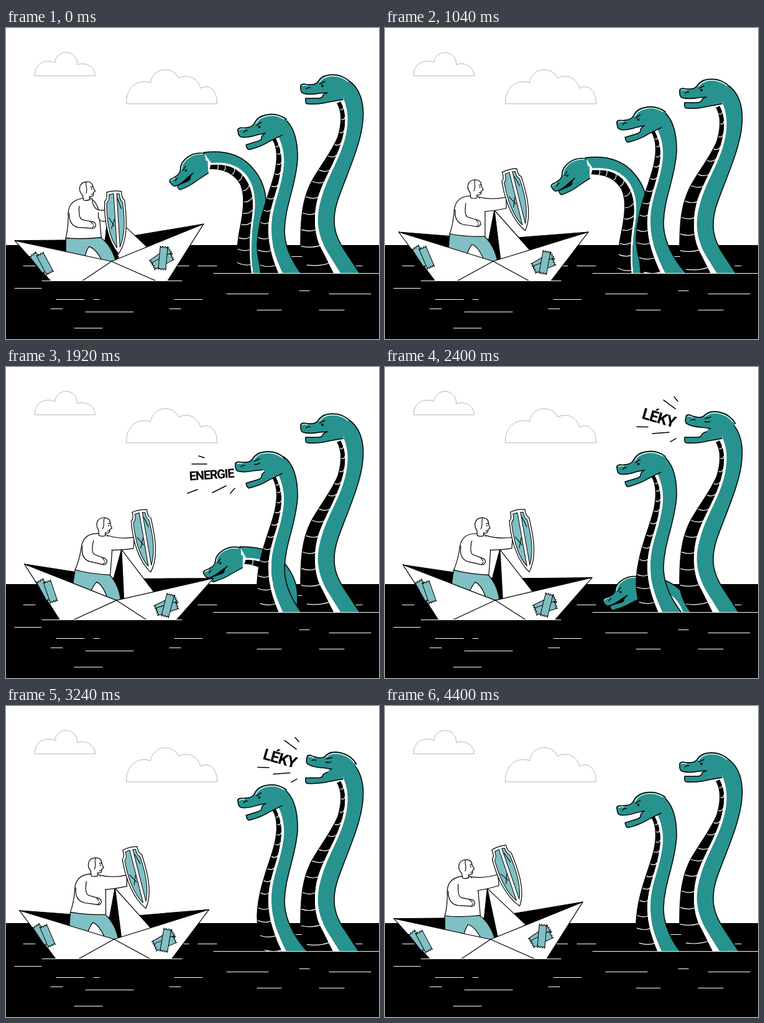
An HTML page for the animation above (4.44 s loop, 600x500 px).

```html
<!DOCTYPE html>
<html lang="cs">
<head>
<meta charset="utf-8">
<title>Paper boat and sea serpents</title>
<style>
  html, body { margin: 0; height: 100%; overflow: hidden; background: #fff; }
  svg { display: block; width: 600px; height: 500px; }
  path, polygon { stroke-linejoin: round; stroke-linecap: round; }
  .line { fill: none; stroke: #000; stroke-width: 1.5; }
  .thin { fill: none; stroke: #fff; stroke-width: 1.2; }
  .teal { fill: #27928e; }
  .pale { fill: #80bfc3; }
  .paper { fill: #fff; stroke: #000; stroke-width: 1.2; }
  .cloud { fill: #fff; stroke: #b4b4b4; }
  text { font-family: Roboto, 'Open Sans', sans-serif; font-weight: 700; letter-spacing: -1.2px; text-anchor: middle; }
</style>
</head>
<body>
<svg viewBox="0 0 600 500">
  <clipPath id="aboveFar"><path d="M0,0H600V394H0Z"/></clipPath>
  <clipPath id="aboveNear"><path d="M0,0H600V406H0Z"/></clipPath>

  <path class="cloud" d="M46,76.500C46,57 63,49 78.500,55.500A18,18 0 0 1 114.500,59C128,54 143,62 143.500,76.500Z"/>
  <path class="cloud" d="M193.500,121.500C193,95 212,81 232.500,88A24,24 0 0 1 278,80.500C293,73 309,81 313,97C327,89 340,101 339.500,121.500Z"/>

  <path d="M0,349H600V500H0Z"/>
  <path class="thin" d="M28,382.500h19M276,382.500h18M309,382.500h30M458,367.500h24M563,382.500h10"/>

  <g id="beasts" clip-path="url(#aboveFar)"></g>

  <g clip-path="url(#aboveNear)">
    <g id="boat">
      <path d="M22,328L174,340L327,328L174,375Z" stroke="#000"/>
      <path class="paper" d="M158,293L176,293L167,340H158Z"/>
      <path d="M176,293L167,340L186,372Z" stroke="#000"/>
      <path class="paper" d="M176,293L233,357L186,374Z"/>

      <path class="paper" d="M126,345H150L170,376H126Z" stroke="none"/>
      <path class="pale" stroke="#000" stroke-width="1.2" d="M104,331L160,335Q176,350 181,375H160Q151,352 140,348Q136,353 132,363L102,356Z"/>
      <path class="paper" d="M136,270C118,271 111,282 111,298Q109,318 104,331Q130,336 161,335L161,294Q160,280 150,271Z"/>
      <path class="paper" d="M130,282Q127,301 133,304L146,308Q154,309 154,315Q152,321 146,319L126,316Q111,312 113,292"/>
      <path class="line" style="stroke-width:1.1" d="M146,308L150,313M148,319L151,315"/>
      <path class="paper" d="M138,273L137,265C130,256 133,244 145,244C153,244 155,249 155,254L158,260L155,262C155,268 153,269 148,268L148,273Q142,275 138,273Z"/>
      <path class="line" style="stroke-width:1.1" d="M145,244C142,250 147,256 143,262M151,253L155,252M151,265L154,264"/>
      <circle cx="152.500" cy="256" r="1"/>

      <path id="arm" class="paper"/>
      <g id="shield">
        <path class="paper" d="M-12,1Q0,-2 12,1Q11,12 16,15C18,45 18,80 1,101C-15,80 -19,45 -16,15Q-11,12 -12,1Z"/>
        <g class="pale" stroke="#000">
          <path d="M-8.500,5L-1,4L-1,91C-12,75 -15,45 -13,18Q-7.500,14 -8.500,5Z"/>
          <path d="M4,4L8.500,5Q8,14 12.500,18C15,45 13,72 4,90Z"/>
        </g>
        <path class="line" style="stroke-width:1.1" d="M-11,42L-3,56M-2,45L-8,60M5,12L10,29"/>
      </g>

      <path class="paper" d="M22,328L174,375L327,328L256,421H91Z"/>
      <path class="line" style="stroke-width:1.2" d="M90,421L174,375L258,421"/>
      <g id="patches"></g>
    </g>
  </g>

  <path class="thin" d="M58,406.500H283M334,394.500H600M14,418.500h43M81,436.500h45M141,436.500h9M271,436.500h45M72,451.500h19M128,456.500h77M263,451.500h18M110,482.500h45M355,427.500h67M472,422.500h16M520,427.500h67M404,453.500h39M504,453.500h40"/>
</svg>

<script>
const LOOP = 4440;
const $ = id => document.getElementById(id);

function add(parent, tag, attrs) {
  const el = document.createElementNS('http://www.w3.org/2000/svg', tag);
  for (const name in attrs) el.setAttribute(name, attrs[name]);
  return parent.appendChild(el);
}

// Smooth curve through [time, value] pairs.
function curve(keys, t) {
  const last = keys.length - 1;
  let i = 0;
  while (i < last - 1 && t >= keys[i + 1][0]) i++;
  const slope = j => {
    const a = keys[Math.max(j - 1, 0)], b = keys[Math.min(j + 1, last)];
    return (b[1] - a[1]) / (b[0] - a[0]);
  };
  const [t0, v0] = keys[i], [t1, v1] = keys[i + 1];
  const h = t1 - t0, s = (t - t0) / h, r = 1 - s;
  return v0 * (1 + 2 * s) * r * r + v1 * s * s * (3 - 2 * s) +
    h * s * r * (slope(i) * r - slope(i + 1) * s);
}

// Evenly spaced points along a path.
function sample(d) {
  const path = add($('beasts'), 'path', { d });
  const length = path.getTotalLength();
  const points = Array.from({ length: 61 }, (_, i) => {
    const p = path.getPointAtLength(length * i / 60);
    return [p.x, p.y];
  });
  path.remove();
  return points;
}

const UPPER = 'M43,10L30,11Q14,14 4,11C-1,9 0,4 0,1C-1,-4 4,-5 10,-3L17,-3Q24,-3 28,-8C33,-16 40,-19 52,-19C64,-19 73,-14 80,-7';
const LOWER = 'M43,10Q36,12 35,16Q34,19 28,19L8,19Q7,28 11,28Q30,29 45,25L68,21';

// Curves run from head to water: back, flank, seam and belly edge.
function makeBeast({ back, flank, seam, belly, ribs, head, jaw, mouth, roar, cry }) {
  const root = add($('beasts'), 'g');
  const [b, f, s, l] = [back, flank, seam, belly].map(sample);
  const band = (p, q, fill) => add(root, 'polygon', { points: [...p, ...q.slice().reverse()].join(' '), fill });
  band(l, s, '#000');
  band(s, f, '#fff');
  band(f, b, '#27928e');
  add(root, 'path', { class: 'line', d: back });
  add(root, 'path', { class: 'line', d: belly });
  for (let i = 1; i <= ribs; i++) {
    const n = Math.round(57 * (i / ribs) ** 1.25);
    const [x0, y0] = l[n], [x1, y1] = s[n];
    add(root, 'path', { class: 'thin', d: `M${x0 + 1},${y0}Q${(x0 + x1) / 2 + 2},${(y0 + y1) / 2 + 4} ${x1},${y1}` });
  }

  const skull = add(root, 'g', { transform: head });
  if (mouth) add(skull, 'path', { d: 'M43,10L14,11L12,18L34,20Z' });
  const chin = add(skull, 'g', { transform: `rotate(${jaw} 43 10)` });
  add(chin, 'path', { class: 'teal', d: LOWER + 'L76,0L50,0Z' });
  add(chin, 'path', { class: 'line', d: LOWER });
  const top = add(skull, 'g');
  add(top, 'path', { class: 'teal', d: UPPER + 'L70,16L50,16Z' });
  add(top, 'path', { class: 'line', d: UPPER });
  add(top, 'path', { class: 'thin', d: 'M30,-7C35,-14 42,-16.800 52,-16.800C62,-16.800 70,-13 76,-8M3,-1Q6,-3 11,-1' });
  add(top, 'path', { class: 'line', d: 'M9,4Q11,1 15,2M31,-4L39,-8' });
  const open = add(top, 'circle', { cx: 35, cy: -1, r: 1.9 });
  const shut = add(top, 'path', { class: 'line', d: 'M31,1Q35,2 39,-1' });

  let shout;
  if (cry) {
    shout = add(root, 'g');
    add(shout, 'text', { transform: cry.at, 'font-size': cry.size }).textContent = cry.word;
    add(shout, 'path', { class: 'line', d: cry.rays });
  }
  return (pose, loud) => {
    root.setAttribute('transform', pose);
    top.setAttribute('transform', loud ? roar : '');
    open.style.display = loud ? 'none' : '';
    shut.style.display = loud ? '' : 'none';
    if (shout) shout.style.display = loud ? '' : 'none';
  };
}

const low = makeBeast({
  back: 'M318,200C350,196 375,203 392,220C412,240 419,262 418,285C416,310 406,325 406,349C406,365 408,380 412,416',
  flank: 'M330,217C360,214 380,224 391,243C402,262 402,285 398,310C394,340 394,370 398,394L401,416',
  seam: 'M329,220C358,217 376,227 387,245C398,262 399,285 395,310C391,340 391,370 395,394L398,416',
  belly: 'M328,226C352,226 368,235 377,251C386,270 381,300 376,325C372,345 371,365 371,410',
  ribs: 12, head: 'translate(264 248) rotate(-35) scale(.9)', jaw: 11, mouth: true
});

const tall = makeBeast({
  back: 'M550,84C569,95 577,120 574,150C571,188 547,238 534,276C522,312 529,335 545,358L583,416',
  flank: 'M543,114C550,130 552,150 546,175C538,210 516,240 507,275C498,305 500,330 516,358L552,416',
  seam: 'M538,118C549,135 546,160 541,178C533,210 512,240 502,272C494,300 495,335 509,358L538,416',
  belly: 'M533,121C541,135 540,155 534,175C524,200 503,225 490,250C478,275 474,300 474,349C475,370 484,384 496,400L508,416',
  ribs: 13, head: 'translate(474 94)', jaw: 0, roar: 'translate(5 0) rotate(13 66 16)',
  cry: {
    word: 'LÉKY', size: 25, at: 'translate(438 90) rotate(16)',
    rays: 'M448,53L467,67M465,48L471,55M405,96L423,96.500M430,107L457,105M459,120L468,115'
  }
});

const middle = makeBeast({
  back: 'M446,145C462,155 470,180 469,212C466,255 449,285 448,325C448,350 460,375 474,394L492,416',
  flank: 'M438,174C448,195 449,215 445,235C440,265 427,290 427,322C427,355 437,375 446,396L456,416',
  seam: 'M433,176C444,195 445,215 441,235C437,262 423,290 422,322C422,352 430,375 439,396L448,416',
  belly: 'M429,179C437,192 437,210 433,230C427,260 406,300 404,349C404,365 408,383 413,398L420,416',
  ribs: 12, head: 'translate(373 165) rotate(-8)', jaw: -9, roar: 'translate(-5 -1) rotate(6 66 16)',
  cry: {
    word: 'ENERGIE', size: 20, at: 'translate(331 181) rotate(-4)',
    rays: 'M299,157H323M310,144L319,147M292,204L308,198M332,203L354,192M361,204L368,196'
  }
});

// Strip of tape with zigzag ends.
function tape(x, y, angle, w, h) {
  const teeth = 6, points = [];
  for (const side of [-1, 1])
    for (let i = 0; i <= teeth; i++)
      points.push([-side * w * (i / teeth - .5), side * (h / 2 - (i % 2) * 2.5)]);
  add($('patches'), 'polygon', {
    points: points.join(' '), class: 'pale', stroke: '#000', 'stroke-width': 1,
    transform: `translate(${x} ${y}) rotate(${angle})`
  });
}
tape(58, 367, -33, 12, 36);
tape(67, 369, -23, 12, 36);
tape(254, 375, 60, 12, 38);
tape(256, 382, 68, 12, 36);
tape(257, 377, 10, 12, 38);

const tilt = [[0, -5.06], [400, -3], [1040, 0], [1920, 4.3], [2160, 4.8], [2840, 1.7], [3640, -2.25], [4000, -3.9], [4440, -5.1]];
const lowX = [[0, 0], [400, 2], [1040, 4], [1920, 54], [2840, 118], [4440, 220]];
const lowY = [[0, 0], [400, 3], [1040, 8], [1920, 84], [2840, 173], [4440, 350]];
const tallY = [[0, 0], [400, 4], [1040, 7], [1680, .7], [1920, 0], [2200, -1], [2840, 3], [3200, 2.6], [3640, .7], [4440, 0]];
const middleY = [[0, 0], [400, -7], [620, -10.5], [1040, -12], [1420, -7], [1920, -1], [2220, 0]];

function draw(t) {
  $('boat').setAttribute('transform', `rotate(${curve(tilt, t)} 174.5 424)`);

  const u = Math.min(1, Math.max(0, (t - 480) / 400));
  const lift = u * u * (3 - 2 * u);
  const mix = (a, b) => a + (b - a) * lift;
  const x = mix(174, 195), y = mix(300, 281);
  $('arm').setAttribute('d', `M152,272Q${x - 23},${y - 4} ${x},${y - 9}V${y + 9}Q${x - 18},${y + 13} 160,295`);
  $('shield').setAttribute('transform', `translate(${mix(188, 200)} ${mix(263, 228)}) rotate(${mix(1.5, -14)})`);

  // The low one tips forward around its snout as it sinks.
  const sunk = curve(lowY, t);
  low(`translate(${curve(lowX, t)} ${sunk}) rotate(${sunk * .06} 264 248)`, false);
  middle(`translate(0 ${curve(middleY, t % 2220)})`, t >= 1320 && t < 2320);
  tall(`translate(0 ${curve(tallY, t)})`, t >= 2400 && t < 3800);
}

const start = performance.now();
function tick() {
  draw((performance.now() - start) % LOOP);
  requestAnimationFrame(tick);
}
tick();
</script>
</body>
</html>
```
